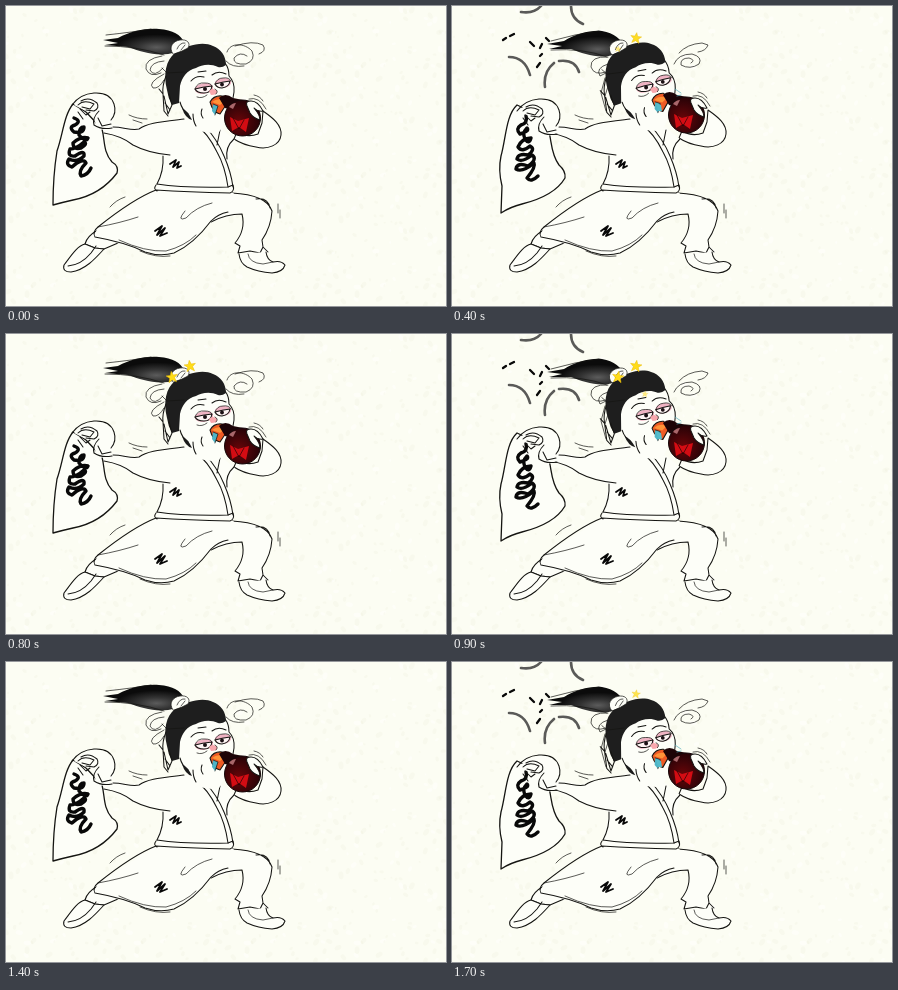
Write an HTML page with a canvas that moves like this. It is 440 px wide and 300 px high and loops after 1.8 s.

```html
<!DOCTYPE html>
<html lang="en">
<head>
<meta charset="utf-8">
<title>Tipsy fighter</title>
<style>
html, body { margin: 0; width: 100%; height: 100%; overflow: hidden; background: #fcfdf3; }
canvas, svg { position: absolute; left: 0; top: 0; width: 440px; height: 300px; }
.ln { fill: none; stroke: #151512; stroke-width: 1.05; stroke-linecap: round; stroke-linejoin: round; }
.thin { stroke-width: .7; }
.body { fill: #fdfef8; }
.skin { fill: #fdfef8; stroke: none; }
.ink { fill: none; stroke: #080808; stroke-width: 3.4; stroke-linecap: round; stroke-linejoin: round; }
.scrawl { stroke-width: 1.8; }
.burst { fill: none; stroke: #5a5a58; stroke-width: 2.6; stroke-linecap: round; }
.star { fill: #ffdc18; stroke: #e9b800; stroke-width: .5; }
</style>
</head>
<body>
<canvas id="paper" width="440" height="300"></canvas>
<svg viewBox="0 0 440 300">
<defs>
  <radialGradient id="tail" cx=".66" cy=".72" r=".5">
    <stop offset="0" stop-color="#5c5c5c"/><stop offset=".45" stop-color="#333"/><stop offset="1" stop-color="#0b0b0b"/>
  </radialGradient>
  <radialGradient id="jug" cx=".4" cy=".6" r=".65">
    <stop offset="0" stop-color="#6a0508"/><stop offset=".55" stop-color="#400408"/><stop offset="1" stop-color="#210206"/>
  </radialGradient>
  <path id="spark" d="M0-6L1.6-1.9 6-2 2.6 1 4 5.6 0 3-4 5.6-2.6 1-6-2-1.6-1.9Z"/>

  <g id="head">
    <path class="skin" d="M171 70C170 84 173 98 180 107L186 124L212 128L218 117L226 100Q230 88 227 76L219 57L190 56Z"/>
    <path class="ln" d="M219 57Q223 62 223 70Q229 76 228 86L227 92M174 96Q176 104 182 108M187 108Q187 115 190 120M196 103Q194 108 197 112"/>
    <path d="M161 84C157 68 160 54 169 47C181 39 197 35 207 40C215 43 220 50 220 59Q216 62 212 61C204 57 195 59 190 62C181 64 176 71 174 80L173 97L166 99Q162 92 161 84Z" fill="#1e1e1e"/>
    <path d="M176 102Q182 105 186 114Q179 112 176 102Z" fill="#1b1b1b"/>
    <path class="ln body thin" d="M167 48C162 41 167 35 174 34C181 33 185 37 182 42L176 45Z"/>
    <path class="ln thin" d="M171 43Q174 36 179 37M175 44L179 39M156 62L161 67L178 66"/>
    <path class="ln" d="M160 70Q156 80 157 88L153 83M158 90L162 108L166 99L163 88M159 97L164 104M157 88L158 105L162 110"/>
    <path class="ln" d="M185 75Q190 69 198 71M206 69Q212 64 220 68M192 66L200 65"/>
    <ellipse cx="198" cy="82.5" rx="9.3" ry="5.4" fill="#efb3c3" transform="rotate(-8 198 82.5)"/>
    <ellipse cx="217" cy="77" rx="8.3" ry="5" fill="#efb3c3" transform="rotate(-8 217 77)"/>
    <path class="ln" d="M189 83Q196 81 206 80Q205 87 198 87Q191 87 189 83ZM209 78Q216 76 224 75Q223 81 216 82Q211 82 209 78Z" style="fill:#fff4f4"/>
    <path class="ln thin" d="M189 83Q191 76 199 77Q205 77 206 80M209 78Q211 72 217 72Q223 71 225 75"/>
    <circle cx="199" cy="83" r="2" fill="#1b1014"/><circle cx="216" cy="78.5" r="1.9" fill="#1b1014"/>
    <path d="M203 85Q207 81 211 85Q212 89 205 89Z" fill="#f9a8ae"/>
    <path class="ln thin" d="M209 83Q213 85 210 88M191 91Q196 93 201 89"/>
    <path class="ln" d="M204 96Q208 89 216 90L222 96L214 108Q207 107 204 96Z" style="fill:#ee5a24"/>
    <path d="M206 96Q212 91 219 95L214 99Z" fill="#ff9338"/>
    <path d="M207 98L212 100L209 109L206 105Z" fill="#4eb4c6"/>
    <path class="ln thin" d="M207 98L212 100L209 109"/>
  </g>

  <g id="pot">
    <path d="M213 92Q219 86 227 92L237 94L228 105L219 102Z" fill="#1d0407"/>
    <circle cx="236.5" cy="112" r="18" fill="url(#jug)" stroke="#16080a"/>
    <path d="M224 111L232 115L243 112L240 126L233 121L226 125Z" fill="#d30c13"/>
    <path class="ln thin" d="M227 112L233 123L238 114" style="stroke:#220305"/>
    <path d="M223 101Q226 97 230 97L227 103Z" fill="#a8676b"/>
    <path class="ln body" d="M241 100Q239 95 245 95Q252 95 257 105Q252 106 248 102Q254 109 254 114Q247 112 244 107Z"/>
    <path class="ln thin" d="M243 93Q253 90 260 103M248 89Q254 90 257 95"/>
  </g>

  <g id="legs">
    <path class="ln body" d="M92 224Q81 230 79 238L89 242L98 243L112 237Z"/>
    <path class="ln body" d="M79 238C71 240 65 250 58 259Q56 266 65 266C79 264 89 253 98 243L89 242Z"/>
    <path class="ln" d="M62 260Q75 259 85 247L90 240"/>
    <path class="skin" d="M226 187C245 188 262 193 266 205Q265 221 256 234L262 247L232 247L229 238Q239 222 238 207L205 216Z"/>
    <path class="ln" d="M226 187C245 188 262 193 266 205Q265 221 256 234L257 241L262 246M205 216Q220 208 236 208Q240 224 229 237L234 240L232 247L244 245L254 247L257 241M250 193Q262 191 264 202"/>
    <path class="ln body" d="M233 248Q234 257 241 261Q252 266 266 267Q277 266 279 259Q275 254 267 256Q261 254 260 246"/>
    <path class="ln thin" d="M242 248Q243 257 257 258L267 256"/>
    <path class="skin" d="M150 184L92 221L88 230L140 246L158 250L185 238L212 208L228 187Z"/>
    <path class="ln" d="M150 184C132 191 112 205 92 221Q86 226 89 231C106 234 125 239 139 246Q154 251 168 247C186 239 199 223 205 215Q212 208 222 206"/>
    <path class="ln thin" d="M92 221Q114 217 132 211M113 234Q139 246 160 245Q179 240 190 229M134 245Q150 252 164 250M179 205Q170 216 180 212Q190 201 206 197"/>
    <path class="ln thin" d="M104 201Q110 194 119 191M272 198L272 207M274 204L274 212"/>
    <path class="ink scrawl" d="M149 225L156 220L151 229L159 222L154 230L161 227"/>
  </g>

  <g id="coat">
    <path class="skin" d="M100 126L108 118L128 123L150 117L184 112L198 118L215 122L229 134L222 156L228 185L150 184L157 150L126 140Z"/>
    <path class="ln" d="M107 121C118 121 125 125 133 123C141 117 153 116 178 113M98 127Q116 130 127 139Q142 147 164 149M157 150Q158 165 151 178"/>
    <path class="ln" d="M188 117Q202 127 211 146Q219 160 222 181M198 119Q211 133 218 150Q225 166 227 181M214 124L211 139M228 133Q219 141 221 153"/>
    <path class="ln" d="M151 178Q177 182 222 181L227 179Q229 185 224 187M150 184Q181 186 224 187M150 179Q147 183 151 185"/>
    <path class="ln thin" d="M123 109Q131 113 141 113M127 114L136 117"/>
    <path class="ink scrawl" d="M164 158L170 154L167 161L173 156L171 162L175 160"/>
  </g>
  <path id="arm" class="ln body" d="M257 105C267 112 276 119 275 129C274 139 262 144 250 141Q237 139 228 133L231 126Q241 132 252 128L256 117Z"/>
  <g id="fist">
    <path class="skin" d="M68 99Q78 87 92 87Q106 89 109 104Q108 118 103 123L92 124L86 108Z"/>
    <path class="ln" d="M66 99Q74 88 88 87Q104 86 108 98Q111 107 105 114M72 99Q78 93 88 98L84 103L76 101M75 95Q83 90 91 97Q94 102 88 105L80 104M74 103L80 109L84 106M93 105Q86 112 88 119Q95 124 106 122M92 112L96 120L105 118M72 106L77 113"/>
  </g>
</defs>

<g id="poseA">
  <path class="ln body" style="stroke-width:1.3" d="M67 98C58 109 57 128 51 145Q47 170 47 199Q58 196 67 194C88 190 102 179 111 167Q113 160 106 156C97 146 99 134 96 123L80 106Z"/>
  <path class="ink" d="M68 112Q76 115 69 119Q62 121 68 126Q78 128 78 121Q73 121 73 129Q80 137 82 132Q75 130 67 137Q67 144 75 142Q82 138 78 136Q70 143 64 143Q61 151 69 150Q79 143 78 150Q71 157 63 153Q59 159 66 161Q77 151 80 157Q72 165 75 170Q82 169 85 162"/>
  <use href="#legs"/><use href="#arm"/><use href="#coat"/><use href="#fist"/>
  <path class="ln thin" d="M156 50Q138 53 140 63Q144 72 155 67M158 55Q145 56 144 64Q148 72 157 62M158 68Q141 77 147 82Q153 83 158 74M221 46C224 36 239 37 246 45Q250 54 240 58Q227 59 228 52Q234 45 241 50M229 40Q247 34 257 39Q261 45 253 48M220 55Q226 62 238 60"/>
  <path d="M97 34L112 32C125 25 140 22 153 23C167 24 175 29 178 36L169 46C154 52 136 46 122 41L99 39L112 37Z" fill="url(#tail)"/>
  <path class="ln thin" d="M100 29Q128 26 145 23M99 40Q131 40 158 49"/>
  <use href="#head"/><use href="#pot"/>
</g>

<g id="poseB" display="none">
  <path class="burst" d="M69 6Q82 8 89 0M57 51Q73 51 78 69M93 81Q91 66 102 57M107 55Q123 53 127 66M119 0Q119 13 131 18"/>
  <path class="ink" style="stroke-width:2.3" d="M78 36L82 40M88 42L90 38M88 50L90 48M85 61L88 57M51 34L54 32M58 30L62 28M94 32L97 35"/>
  <path class="ln body" style="stroke-width:1.3" d="M65 99C54 109 54 132 49 150Q46 164 50 180L49 207Q58 201 70 198C90 193 106 184 113 172Q114 165 107 159C98 147 100 133 96 123L80 106Z"/>
  <path class="ink" d="M74 110Q76 117 69 119Q63 123 68 128Q78 125 75 122Q70 127 73 133Q77 139 79 132Q70 132 66 141Q70 147 78 140Q84 143 76 149Q66 147 65 153Q70 157 80 149Q86 153 76 160Q65 156 64 163Q70 167 82 157Q84 161 75 172Q79 177 86 170"/>
  <use href="#legs"/><use href="#arm" x="-1" y="-1"/><use href="#coat"/>
  <use href="#fist" x="-1" y="6"/>
  <path class="ln thin" d="M156 51Q138 50 139 61Q142 70 154 66M156 58Q143 62 148 70L158 65M153 72L149 87L154 105M158 74L153 90M222 58Q226 48 240 48Q251 51 247 58Q238 64 229 59Q228 52 237 52Q244 54 239 57M227 47Q235 38 250 37L256 39Q254 45 246 46"/>
  <path d="M95 38L112 35C123 28 138 24 150 25C162 27 170 34 172 40L163 48C149 54 132 48 119 43L97 43L110 40Z" fill="url(#tail)"/>
  <path class="ln thin" d="M99 35Q123 28 147 25M99 44Q132 42 155 51"/>
  <g transform="translate(-3 -2) rotate(-4 205 110)"><use href="#head"/></g>
  <use href="#pot" x="-2" y="-3"/>
  <path d="M204 97L209 99L210 105L206 105Z" fill="#55bccb"/>
  <path class="ln thin" d="M223 83L229 87M225 90L229 89" style="stroke:#55aebc"/>
</g>
<g id="stars"></g>
</svg>
<script>
const get = id => document.getElementById(id);
let seed = 71;
const rnd = () => (seed = (seed * 16807) % 2147483647) / 2147483647;

function drawPaper() {
  const size = 110, tile = document.createElement('canvas');
  tile.width = tile.height = size;
  const c = tile.getContext('2d');
  c.fillStyle = '#fcfdf3';
  c.fillRect(0, 0, size, size);
  for (let i = 0; i < 80; i++) {
    const x = rnd() * size, y = rnd() * size, r = 1 + rnd() * 3;
    c.fillStyle = i % 3 ? 'rgba(232,232,203,.16)' : 'rgba(255,255,253,.5)';
    for (const ox of [-size, 0, size]) for (const oy of [-size, 0, size]) {
      c.beginPath();
      c.ellipse(x + ox, y + oy, r, r * .65, i, 0, Math.PI * 2);
      c.fill();
    }
  }
  const p = get('paper').getContext('2d');
  p.fillStyle = p.createPattern(tile, 'repeat');
  p.fillRect(0, 0, 440, 300);
}

// x, y, step of appearance
const sparks = [[184, 32, 2], [166, 43, 4], [193, 60, 9]];
const sway = 7, twinkle = 14;
const marks = sparks.map(([x, y]) => {
  const el = document.createElementNS('http://www.w3.org/2000/svg', 'use');
  el.setAttribute('href', '#spark');
  el.setAttribute('class', 'star');
  get('stars').append(el);
  return el;
});

const toggle = (el, on) => el.setAttribute('display', on ? 'inline' : 'none');

function show(step) {
  const beat = step % sway, lean = beat > 1 && beat < 5;
  toggle(get('poseA'), !lean);
  toggle(get('poseB'), lean);
  const phase = step % twinkle;
  sparks.forEach(([x, y, from], i) => {
    const grow = Math.min(1, .55 + (phase - from) * .2);
    toggle(marks[i], phase >= from && phase < twinkle - 1);
    marks[i].setAttribute('opacity', grow);
    marks[i].setAttribute('transform', `translate(${x} ${y}) rotate(${lean ? 8 : -8}) scale(${grow * .95})`);
  });
}

let last = -1;
const start = performance.now();
function tick(now) {
  const step = Math.floor((Math.max(0, now - start) % 1800) / 100);
  if (step !== last) show(last = step);
  requestAnimationFrame(tick);
}
drawPaper();
show(0);
requestAnimationFrame(tick);
</script>
</body>
</html>
```
